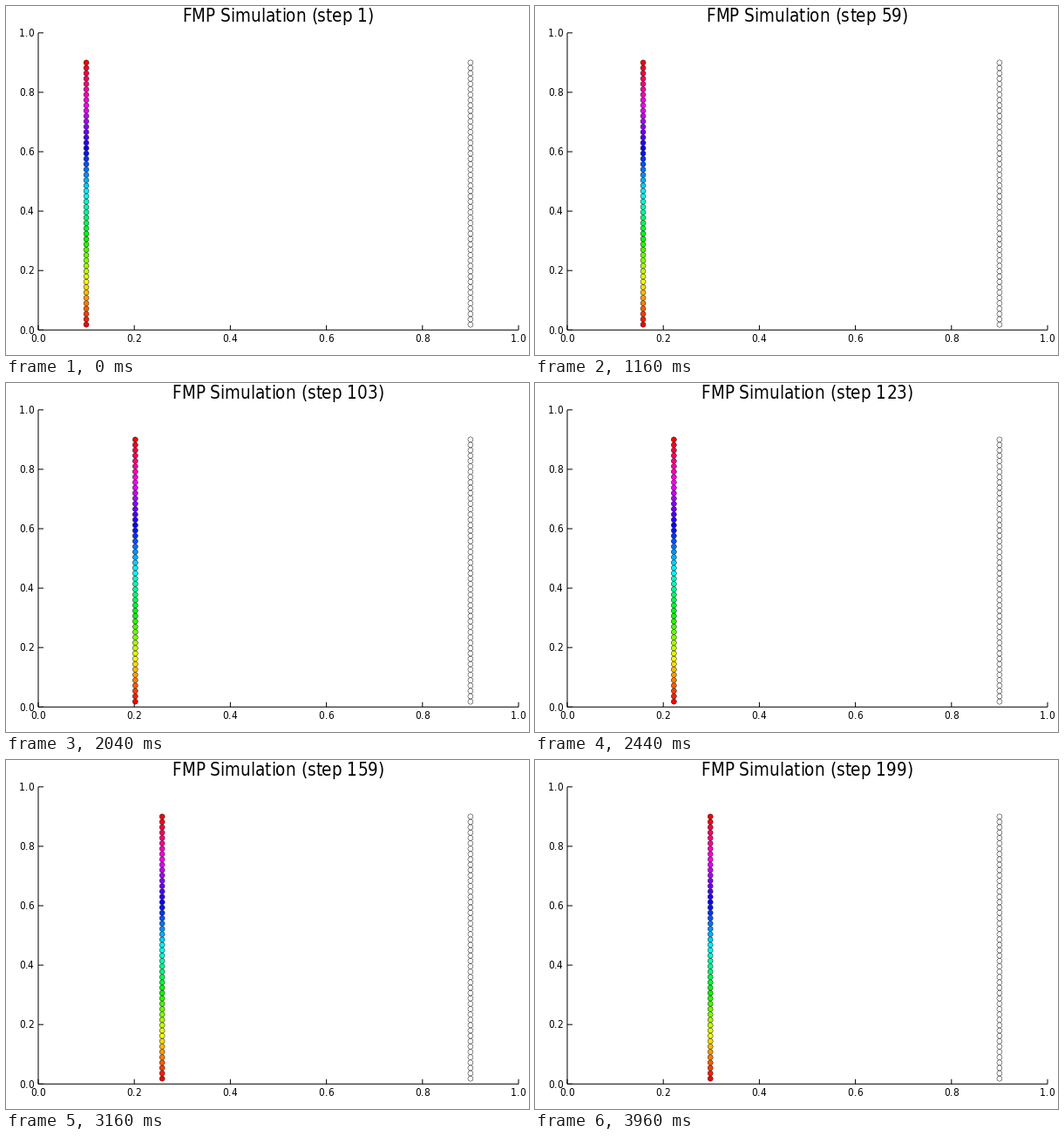
Animation of 600x400 px, one loop 4000 ms. Source, as a matplotlib script:

```python
import colorsys
import math

import numpy as np
import matplotlib.pyplot as plt
from matplotlib.animation import FuncAnimation
from matplotlib.textpath import TextPath

W, H, DPI = 600, 400, 100
PT = 72 / DPI                      # points per pixel
LEFT, RIGHT, TOP, BOTTOM = 37, 588, 30.8, 371.3
FRAMES, INTERVAL = 100, 40
COUNT = 50
TITLE_PT, TICK_PT = 14.8, 8.5
CONDENSED = 0.9                    # advance relative to the regular face

plt.rcParams["font.family"] = "DejaVu Sans"

fig = plt.figure(figsize=(W / DPI, H / DPI), dpi=DPI, facecolor="white")
ax = fig.add_axes([0, 0, 1, 1])
ax.set_xlim(0, W)
ax.set_ylim(H, 0)
ax.axis("off")


def to_x(v):
    return LEFT + v * (RIGHT - LEFT)


def to_y(v):
    return BOTTOM - v * (BOTTOM - TOP)


advances = {}


def advance(ch, pt):
    """Condensed glyph advance in pixels."""
    if (ch, pt) not in advances:
        size = pt / PT
        ends = [TextPath((0, 0), s, size=size).get_extents().x1
                for s in ("|" + ch + "|", "||")]
        advances[ch, pt] = CONDENSED * (ends[0] - ends[1])
    return advances[ch, pt]


def layout(text, x, pt, align):
    """Pen position of every glyph."""
    steps = [advance(ch, pt) for ch in text]
    pen = x - align * sum(steps)
    return pen + np.concatenate(([0], np.cumsum(steps)[:-1]))


def glyph(ch, x, y, pt):
    return ax.text(x, y, ch, fontsize=pt, fontstretch="condensed",
                   color="black", ha="left", va="baseline")


def label(text, x, y, align):
    for ch, px in zip(text, layout(text, x, TICK_PT, align)):
        glyph(ch, px, y, TICK_PT)


def line(xs, ys):
    ax.plot(xs, ys, color="black", lw=PT, solid_capstyle="butt",
            snap=False, zorder=1)


# axes with inward ticks
line([LEFT, RIGHT], [BOTTOM, BOTTOM])
line([LEFT, LEFT], [BOTTOM, TOP])
for i in range(6):
    v = i / 5
    x, y = to_x(v), to_y(v)
    line([x, x], [BOTTOM, BOTTOM - 5.5])
    line([LEFT, LEFT + 6], [y, y])
    label(f"{v:.1f}", x - 0.5, 385, 0.5)
    label(f"{v:.1f}", 31.7, math.floor(y + 4.7), 1)

# moving rainbow column and fixed empty column
ys = to_y(0.018 * np.arange(1, COUNT + 1))
rainbow = [colorsys.hsv_to_rgb(i / (COUNT - 1), 1, 1) for i in range(COUNT)]
fills = rainbow + [(1, 1, 1)] * COUNT


def positions(step):
    moving = np.full(COUNT, to_x(0.1 + 0.001 * (step - 1)))
    fixed = np.full(COUNT, to_x(0.9))
    return np.column_stack([np.concatenate([moving, fixed]),
                            np.concatenate([ys, ys])])


start = positions(1)
dots = ax.scatter(start[:, 0], start[:, 1], s=(5.9 * PT) ** 2, c=fills,
                  edgecolors="black", linewidths=0.45 * PT, zorder=2)

title = [glyph("", 0, 18, TITLE_PT) for _ in range(25)]


def update(k):
    step = 1 + 2 * k
    dots.set_offsets(positions(step))
    text = f"FMP Simulation (step {step})"
    pens = layout(text, (LEFT + RIGHT) / 2 - 0.4, TITLE_PT, 0.5)
    for g in title:
        g.set_text("")
    for g, ch, px in zip(title, text, pens):
        g.set_text(ch)
        g.set_x(px)
    return [dots, *title]


anim = FuncAnimation(fig, update, frames=FRAMES, interval=INTERVAL,
                     init_func=lambda: update(0), repeat=True,
                     repeat_delay=0, blit=False)
plt.show()
```
